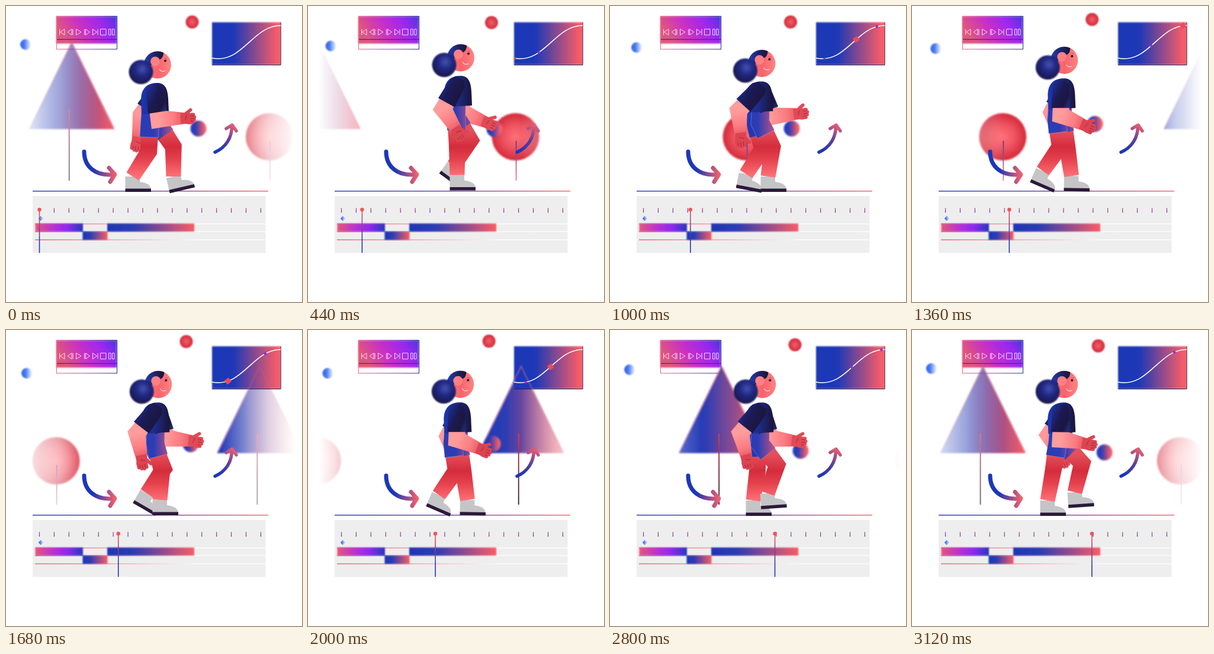
These frames come from a looping animation (500x500 px, 3160 ms). An HTML page:

```html
<!DOCTYPE html>
<html lang="en">
<head>
<meta charset="utf-8">
<title>Walk cycle</title>
<style>
html, body { margin: 0; width: 100%; height: 100%; overflow: hidden; background: #fff; }
svg { display: block; width: 100%; height: 100%; }
.icons { fill: none; stroke: #f3dcff; stroke-width: 1; stroke-linejoin: round; }
.arrow { fill: none; stroke-linecap: round; stroke-linejoin: round; }
</style>
</head>
<body>
<svg viewBox="0 0 500 500">
  <defs>
    <filter id="soft" x="-20%" y="-20%" width="140%" height="140%"><feGaussianBlur stdDeviation="1.7"/></filter>
    <filter id="edge" x="-10%" y="-20%" width="120%" height="140%"><feGaussianBlur stdDeviation=".9"/></filter>
    <linearGradient id="blueRed"><stop stop-color="#1c37b8"/><stop offset=".3" stop-color="#2a3cb4"/><stop offset="1" stop-color="#fb5c66"/></linearGradient>
    <linearGradient id="curveFill"><stop stop-color="#1c37b8"/><stop offset=".32" stop-color="#2038b6"/><stop offset=".95" stop-color="#f75c68"/></linearGradient>
    <linearGradient id="ground"><stop stop-color="#1c37b8"/><stop offset=".45" stop-color="#5a3fa0"/><stop offset="1" stop-color="#ff6068"/></linearGradient>
    <linearGradient id="tool" y1=".3" x2="1" y2="0"><stop stop-color="#e0567c"/><stop offset=".36" stop-color="#c930c4"/><stop offset=".72" stop-color="#9a28f0"/><stop offset=".9" stop-color="#6a30e4"/><stop offset="1" stop-color="#3f38d4"/></linearGradient>
    <linearGradient id="clip"><stop stop-color="#e2567c"/><stop offset=".4" stop-color="#b52fd8"/><stop offset=".68" stop-color="#8b2af0"/><stop offset="1" stop-color="#2438c0"/></linearGradient>
    <linearGradient id="frame"><stop stop-color="#f0607a"/><stop offset=".5" stop-color="#8a4aa8"/><stop offset="1" stop-color="#1c2a90"/></linearGradient>
    <linearGradient id="fade"><stop stop-color="#f0525e"/><stop offset=".35" stop-color="#f49aa0"/><stop offset=".7" stop-color="#fff"/><stop offset="1" stop-color="#fff"/></linearGradient>
    <linearGradient id="tick" x2="0" y2="1"><stop stop-color="#e0486c"/><stop offset="1" stop-color="#2a3cc0"/></linearGradient>
    <linearGradient id="head" x2="0" y2="1"><stop stop-color="#f5505c"/><stop offset=".5" stop-color="#6a3f98"/><stop offset=".75" stop-color="#1f37b6"/><stop offset="1" stop-color="#1c37b8"/></linearGradient>
    <linearGradient id="trunk1" x2="0" y2="1"><stop stop-color="#e43a4c"/><stop offset=".55" stop-color="#7c2c44"/><stop offset="1" stop-color="#3a2c38"/></linearGradient>
    <linearGradient id="trunk2" x2="0" y2="1"><stop stop-color="#3c3a9c"/><stop offset="1" stop-color="#f0708a"/></linearGradient>
    <radialGradient id="crown"><stop stop-color="#ff7078"/><stop offset=".5" stop-color="#ee5460"/><stop offset="1" stop-color="#d4293a"/></radialGradient>
    <radialGradient id="redBall"><stop stop-color="#f0606a"/><stop offset="1" stop-color="#d4293a"/></radialGradient>
    <linearGradient id="blueBall"><stop stop-color="#2f62ee"/><stop offset=".4" stop-color="#4a7cf5"/><stop offset="1" stop-color="#5a8cff" stop-opacity=".08"/></linearGradient>
    <linearGradient id="handBall"><stop offset=".1" stop-color="#1c3cc4"/><stop offset=".35" stop-color="#3a3cac"/><stop offset=".9" stop-color="#f9606a"/></linearGradient>
    <linearGradient id="arrow1" gradientUnits="userSpaceOnUse" x1="132" x2="184" y1="0" y2="0"><stop offset=".3" stop-color="#1c37b8"/><stop offset="1" stop-color="#f0606c"/></linearGradient>
    <linearGradient id="arrow2" gradientUnits="userSpaceOnUse" x1="360" x2="384" y1="245" y2="203"><stop stop-color="#1c37b8"/><stop offset=".5" stop-color="#5c3f9c"/><stop offset="1" stop-color="#e05c74"/></linearGradient>
    <linearGradient id="sides" gradientUnits="userSpaceOnUse" x1="0" x2="500" y1="0" y2="0">
      <stop offset=".036" stop-color="#000"/><stop offset=".1" stop-color="#333"/><stop offset=".18" stop-color="#777"/><stop offset=".25" stop-color="#ccc"/><stop offset=".31" stop-color="#fff"/>
      <stop offset=".72" stop-color="#fff"/><stop offset=".81" stop-color="#999"/><stop offset=".89" stop-color="#404040"/><stop offset=".98" stop-color="#000"/>
    </linearGradient>
    <mask id="stage" maskUnits="userSpaceOnUse" x="0" y="0" width="500" height="500" style="mask-type:luminance"><rect width="500" height="500" fill="url(#sides)"/></mask>
    <linearGradient id="leg" gradientUnits="userSpaceOnUse" x1="0" x2="0" y1="210" y2="290"><stop stop-color="#e4505a"/><stop offset=".35" stop-color="#d42c3c"/><stop offset=".6" stop-color="#e4404c"/><stop offset="1" stop-color="#ff747a"/></linearGradient>
    <linearGradient id="shortsFar" gradientUnits="userSpaceOnUse" x1="250" x2="288" y1="0" y2="0"><stop offset=".15" stop-color="#2038b6"/><stop offset="1" stop-color="#d8587c"/></linearGradient>
    <linearGradient id="shortsNear" gradientUnits="userSpaceOnUse" x1="228" x2="282" y1="0" y2="0"><stop offset=".1" stop-color="#2a3cb4"/><stop offset=".4" stop-color="#2c3cb4"/><stop offset="1" stop-color="#d0547c"/></linearGradient>
    <linearGradient id="shirt"><stop stop-color="#1c37b4"/><stop offset=".5" stop-color="#1c2a84"/><stop offset="1" stop-color="#1a1438"/></linearGradient>
    <linearGradient id="sleeve" x2="1" y2=".7"><stop stop-color="#1f36a8"/><stop offset=".5" stop-color="#1b1a54"/><stop offset=".85" stop-color="#1c163e"/><stop offset="1" stop-color="#20286c"/></linearGradient>
    <radialGradient id="bun" cx=".55" cy=".38" r=".62"><stop stop-color="#4450b0"/><stop offset=".45" stop-color="#212a84"/><stop offset="1" stop-color="#19164a"/></radialGradient>
    <linearGradient id="face"><stop stop-color="#ff8a8a"/><stop offset=".5" stop-color="#f9626a"/><stop offset="1" stop-color="#ff8484"/></linearGradient>
    <linearGradient id="hair"><stop stop-color="#2440b8"/><stop offset=".55" stop-color="#1b2468"/><stop offset="1" stop-color="#1a1434"/></linearGradient>
    <linearGradient id="skinFar" gradientUnits="userSpaceOnUse"><stop stop-color="#ff9898"/><stop offset=".5" stop-color="#fa7a80"/><stop offset="1" stop-color="#e04a56"/></linearGradient>
    <linearGradient id="skinNear" gradientUnits="userSpaceOnUse"><stop stop-color="#ff9c9c"/><stop offset=".5" stop-color="#fb7c82"/><stop offset="1" stop-color="#dc4450"/></linearGradient>
    <g id="shoe">
      <path d="M-12.5 0H12V9C21 10 30 13 31 21H-12.5Z" fill="#c5c5c7"/>
      <path d="M-12.5 20.5H31V26H-12.5Z" fill="#2a1a38"/>
    </g>
    <g id="hand" transform="scale(.88)">
      <path d="M-16-10L1-10L7-4L8 9L0 12L-16 10Z"/>
      <path d="M-9-6L4-15M0-6H9M0-1H11M0 4H10M-1 9H7" fill="none" stroke-width="6.4" stroke-linecap="round"/>
      <path d="M3-3.5H9M3 1.5H10M3 6.5H8M-4-6L-7 3" fill="none" stroke="#8e1c34" stroke-width=".8" stroke-linecap="round"/>
    </g>
  </defs>

  <rect x="85" y="17.5" width="102" height="46" fill="url(#tool)" filter="url(#edge)"/>
  <rect x="85" y="55.8" width="102" height="1.3" fill="#2438b0"/>
  <rect x="85.5" y="17.5" width="102" height="55.5" fill="none" stroke="url(#frame)"/>
  <g class="icons">
    <path d="M90.5 39V49M99 39V49L91.5 44ZM111 39V49L104 44ZM113 39V49M118.5 39V49L127 44ZM132.5 39V49M134.5 39V49L141.5 44ZM146.5 39V49L153.5 44ZM155 39V49"/>
    <path d="M159.5 39H169V49H159.5ZM173.5 39H177V49H173.5ZM179.5 39H183V49H179.5Z"/>
  </g>

  <g mask="url(#stage)">
    <g id="cone">
      <path d="M0 61L72 208H-72Z" fill="url(#blueRed)" filter="url(#soft)"/>
      <rect x="-5.2" y="175" width="1.9" height="120" fill="url(#trunk1)"/>
    </g>
    <g id="globe">
      <circle cy="221" r="40" fill="url(#crown)" filter="url(#soft)"/>
      <rect x=".2" y="228" width="1.6" height="67" fill="url(#trunk2)"/>
    </g>
  </g>

  <rect x="348" y="27.5" width="116" height="72" fill="url(#curveFill)" filter="url(#edge)"/>
  <path d="M348 99.5H464V27.5" fill="none" stroke="#241a50"/>
  <g mask="url(#stage)">
    <path id="coneEdge" d="M-71 207L0 61L71 207" fill="none" stroke="#ee7088" stroke-opacity=".6" stroke-width="1.8" filter="url(#edge)"/>
  </g>
  <path d="M348 88C400 98 416 33 464 33" fill="none" stroke="#fff" stroke-width="1.6"/>
  <g id="dots"></g>

  <circle id="ballRed" r="11" fill="url(#redBall)" filter="url(#edge)"/>
  <circle id="ballBlue" r="9" fill="url(#blueBall)" filter="url(#edge)"/>
  <circle id="ballHand" r="13.5" fill="url(#handBall)" filter="url(#soft)"/>

  <path class="arrow" d="M132 246C132 272 152 288 182 284.5M174 273.5L184 284.500L176 297" stroke="url(#arrow1)" stroke-width="7"/>
  <path class="arrow" d="M353 247C371 239 382 223 381.5 202M372 207L382 201L389 211" stroke="url(#arrow2)" stroke-width="5.5"/>

  <rect x="45" y="312" width="398" height="1.4" fill="url(#ground)"/>
  <rect x="45" y="321" width="393.5" height="96" fill="#eee"/>
  <g id="ticks" fill="url(#tick)"></g>
  <g fill="url(#fade)">
    <rect x="49" y="367.5" width="389" height="1.3"/>
    <rect x="49" y="380.5" width="389" height="1.3"/>
    <rect x="49" y="394.3" width="389" height="1.3"/>
  </g>
  <g filter="url(#edge)">
    <rect x="49.5" y="367.5" width="80.5" height="13.5" fill="url(#clip)"/>
    <rect x="171" y="367.5" width="147" height="13.5" fill="url(#blueRed)"/>
    <rect x="129.5" y="381" width="42" height="14" fill="url(#blueRed)"/>
  </g>
  <path d="M58.5 355L62 359L58.5 363L55 359Z" fill="url(#blueBall)" stroke="#5a8cf0" stroke-width=".6"/>
  <g id="playhead">
    <rect x="-.8" y="344" width="1.6" height="73" fill="url(#head)"/>
    <circle cy="344" r="3.2" fill="#f4525e"/>
  </g>

  <g id="person">
    <path id="farArm" fill="url(#skinFar)"/>
    <use id="farHand" href="#hand" fill="#e04a56" stroke="#e04a56" stroke-width="0"/>
    <use id="farShoe" href="#shoe"/>
    <path id="farLeg" fill="url(#leg)"/>
    <path id="farShorts" fill="url(#shortsFar)"/>
    <use id="nearShoe" href="#shoe"/>
    <path id="nearLeg" fill="url(#leg)"/>
    <path id="nearShorts" fill="url(#shortsNear)" stroke="#b8b4e4" stroke-width=".4"/>
    <path id="farSleeve" fill="url(#sleeve)"/>
    <path id="torso" d="M229-16L228-42C229-62 240-69 256-69C268-69 273-60 274-42L275-19Z" fill="url(#shirt)"/>
    <g id="skull">
      <circle r="23" fill="url(#face)"/>
      <path d="M-23-3A23 23 0 0 1 10-20.7C10-13 6-9 2-9L-8-3L-14 4Z" fill="url(#hair)"/>
      <circle cx="-4" cy="-6" r="8" fill="#ff8084"/>
      <circle cx="13" cy="-7" r="2.1" fill="#24163a"/>
      <path d="M12-11Q15-12 16-10" fill="none" stroke="#c03048" stroke-width=".8"/>
      <path d="M3 7Q6 13 13 10" fill="none" stroke="#fff" stroke-width="1"/>
      <circle cx="-28" cy="12" r="20.5" fill="url(#bun)" filter="url(#edge)"/>
    </g>
    <path id="nearArm" fill="url(#skinNear)"/>
    <use id="nearHand" href="#hand" fill="#dc4450" stroke="#dc4450" stroke-width="0"/>
    <path id="nearSleeve" fill="url(#sleeve)"/>
  </g>
</svg>
<script>
const LOOP = 3160, STRIDE = 640, STEP = 40;
const SCROLL = 0.2145, SPAN = 678;
const $ = id => document.getElementById(id);
const set = (id, attrs) => { for (const k in attrs) $(id).setAttribute(k, attrs[k]); };
const move = (id, x, y, r = 0) => set(id, { transform: `translate(${x} ${y}) rotate(${r})` });

// Smooth periodic curve through keys [time, ...values]
function track(keys, period, t) {
  const n = keys.length;
  const at = i => {
    const k = keys[(i + n) % n], lap = Math.floor(i / n) * period;
    return [k[0] + lap, ...k.slice(1)];
  };
  let i = n - 1;
  while (keys[i][0] > t) i--;
  const [a, b, c, d] = [at(i - 1), at(i), at(i + 1), at(i + 2)];
  const h = c[0] - b[0], u = (t - b[0]) / h, v = 1 - u;
  return b.slice(1).map((p, j) => {
    const q = c[j + 1];
    const m0 = h * (q - a[j + 1]) / (c[0] - a[0]);
    const m1 = h * (d[j + 1] - p) / (d[0] - b[0]);
    return p * v * v * (1 + 2 * u) + m0 * u * v * v + q * u * u * (3 - 2 * u) - m1 * u * u * v;
  });
}

const mix = (a, b, k) => [a[0] + (b[0] - a[0]) * k, a[1] + (b[1] - a[1]) * k];

// Middle joint of a two-bone limb
function joint(a, b, l1, l2, side) {
  const dx = b[0] - a[0], dy = b[1] - a[1], len = Math.hypot(dx, dy);
  const d = Math.min(len, l1 + l2 - 0.01);
  const along = (d * d + l1 * l1 - l2 * l2) / (2 * d);
  const out = side * Math.sqrt(Math.max(0, l1 * l1 - along * along));
  const ux = dx / len, uy = dy / len;
  return [a[0] + ux * along - uy * out, a[1] + uy * along + ux * out];
}

// Outline of a bent, tapered limb
function limb(pts, widths) {
  const dirs = pts.slice(1).map((p, i) => Math.atan2(p[1] - pts[i][1], p[0] - pts[i][0]));
  const left = [], right = [];
  pts.forEach((p, i) => {
    const a = dirs[Math.max(0, i - 1)], b = dirs[Math.min(i, dirs.length - 1)];
    const x = Math.cos(a) + Math.cos(b), y = Math.sin(a) + Math.sin(b);
    const m = Math.hypot(x, y) || 1, w = widths[i] / 2 / Math.max(0.7, m / 2);
    left.push([p[0] - y / m * w, p[1] + x / m * w]);
    right.unshift([p[0] + y / m * w, p[1] - x / m * w]);
  });
  return 'M' + left.concat(right).map(p => p.map(v => v.toFixed(2)).join(' ')).join('L') + 'Z';
}

const balls = {
  ballRed: [[0, 314.5, 27], [440, 310, 28], [1000, 305, 27], [1680, 304.5, 19.5], [2360, 308, 20], [2800, 312.5, 25]],
  ballBlue: [[0, 33, 65], [440, 38.5, 67.5], [1000, 45, 70], [1680, 35, 73], [2360, 33, 72], [2800, 33, 67]],
  ballHand: [[0, 325, 207], [440, 315, 208], [1000, 307, 207], [1680, 312, 193], [2360, 313, 195], [2800, 322, 204]]
};

// Walk keys: hip y; ankle x, y, foot angle; hand x, y
const hipKeys = [[0, 199], [120, 188], [240, 191.5], [360, 196.5], [400, 191.5], [440, 187], [560, 191.5]];
const feet = {
  near: [[0, 214, 288, 0], [60, 214, 283, 16], [120, 240, 270, 34], [180, 257, 270, 12], [240, 266, 276, -4],
    [300, 274, 286, -8], [360, 267, 288, 0], [400, 260, 287, 0], [440, 252, 285.5, 0], [560, 229, 288, 0]],
  far: [[0, 283, 288, -13], [50, 275, 288, 0], [120, 262, 286, 0], [240, 242, 288, 0], [300, 232, 288, 1],
    [360, 230, 284, 11], [400, 238, 276, 30], [440, 247, 269, 36], [560, 275, 274, -4]]
};
const hands = {
  near: [[0, 309, 189], [120, 288, 212], [240, 233, 224], [360, 222, 228], [400, 231, 225], [440, 256, 217], [560, 301, 193]],
  far: [[0, 221, 235], [120, 272, 222], [240, 321, 188], [360, 324, 181], [400, 322, 188], [440, 308, 199], [560, 256, 222]]
};

function walk(t) {
  const [hipY] = track(hipKeys, STRIDE, t);
  const lean = (199 - hipY) * 0.17;
  for (const side of ['near', 'far']) {
    const near = side === 'near';
    const [fx, fy, turn] = track(feet[side], STRIDE, t);
    const hip = [250 + (fx - 250) * 0.2, hipY];
    const ankle = [fx, fy], knee = joint(hip, ankle, 47, 50, -1);
    set(side + 'Leg', { d: limb([hip, knee, ankle], [31, 28, 25]) });
    set(side + 'Shorts', { d: limb([[hip[0] + 1, hipY - 20], hip, mix(hip, knee, 0.48)], [30, 31, 32]) });
    move(side + 'Shoe', fx, fy, turn);

    const shoulder = [(near ? 250 : 256) + lean, hipY - 56];
    const hand = track(hands[side], STRIDE, t);
    const elbow = joint(shoulder, hand, 50, 51, 1);
    const cuff = mix(shoulder, elbow, 0.74);
    set(side + 'Arm', { d: limb([shoulder, elbow, mix(elbow, hand, 0.85)], [24, 29, 19]) });
    set(side + 'Sleeve', { d: limb([mix(shoulder, elbow, -0.2), mix(shoulder, elbow, -0.02), cuff], [16, 28, 32]) });
    set(near ? 'skinNear' : 'skinFar', { x1: elbow[0], y1: elbow[1], x2: hand[0], y2: hand[1] });
    move(side + 'Hand', hand[0], hand[1], Math.atan2(hand[1] - elbow[1], hand[0] - elbow[0]) * 180 / Math.PI);
  }
  move('torso', lean, hipY);
  move('skull', 256 + lean, hipY - 99.5);
}

// Keyframe dots riding the easing curve: start time, half size, colour
const dots = [[120, 3, '#8a34d0'], [430, 6, '#ee4a58'], [905, 3, '#8a34d0'], [1490, 6, '#ee4a58'], [1864, 3, '#a034b8'], [2301, 3, '#8a34d0']];
const bezier = (u, a, b, c, d) => (1 - u) ** 3 * a + 3 * u * (1 - u) ** 2 * b + 3 * u * u * (1 - u) * c + u ** 3 * d;

function ride(t) {
  $('dots').innerHTML = dots.map(([start, size, fill]) => {
    const u = (t - start) / 975;
    if (u < 0 || u > 0.98) return '';
    const x = bezier(u, 348, 400, 416, 464), y = bezier(u, 88, 98, 33, 33);
    const r = size * Math.min(1, 0.35 + u * 5);
    return `<path d="M0-${r}L${r} 0L0 ${r}L-${r} 0Z" fill="${fill}" transform="translate(${x} ${y}) rotate(12)"/>`;
  }).join('');
}

function scroll(id, start, t) {
  const x = start - SCROLL * t;
  move(id, x < -80 ? x + SPAN : x, 0);
}

function draw(t) {
  scroll('cone', 111, t);
  scroll('coneEdge', 111, t);
  scroll('globe', 445, t);
  for (const id in balls) move(id, ...track(balls[id], LOOP, t));
  move('playhead', 56.5 + t * 0.0793, 0);
  ride(t);
  walk(t % STRIDE);
}

$('ticks').innerHTML = Array.from({ length: 16 }, (_, i) =>
  `<rect x="${(55.9 + i * 24.93).toFixed(2)}" y="341" width="1.2" height="8"/>`).join('');

function tick() {
  draw(Math.floor(performance.now() % LOOP / STEP) * STEP);
  requestAnimationFrame(tick);
}
tick();
</script>
</body>
</html>
```
